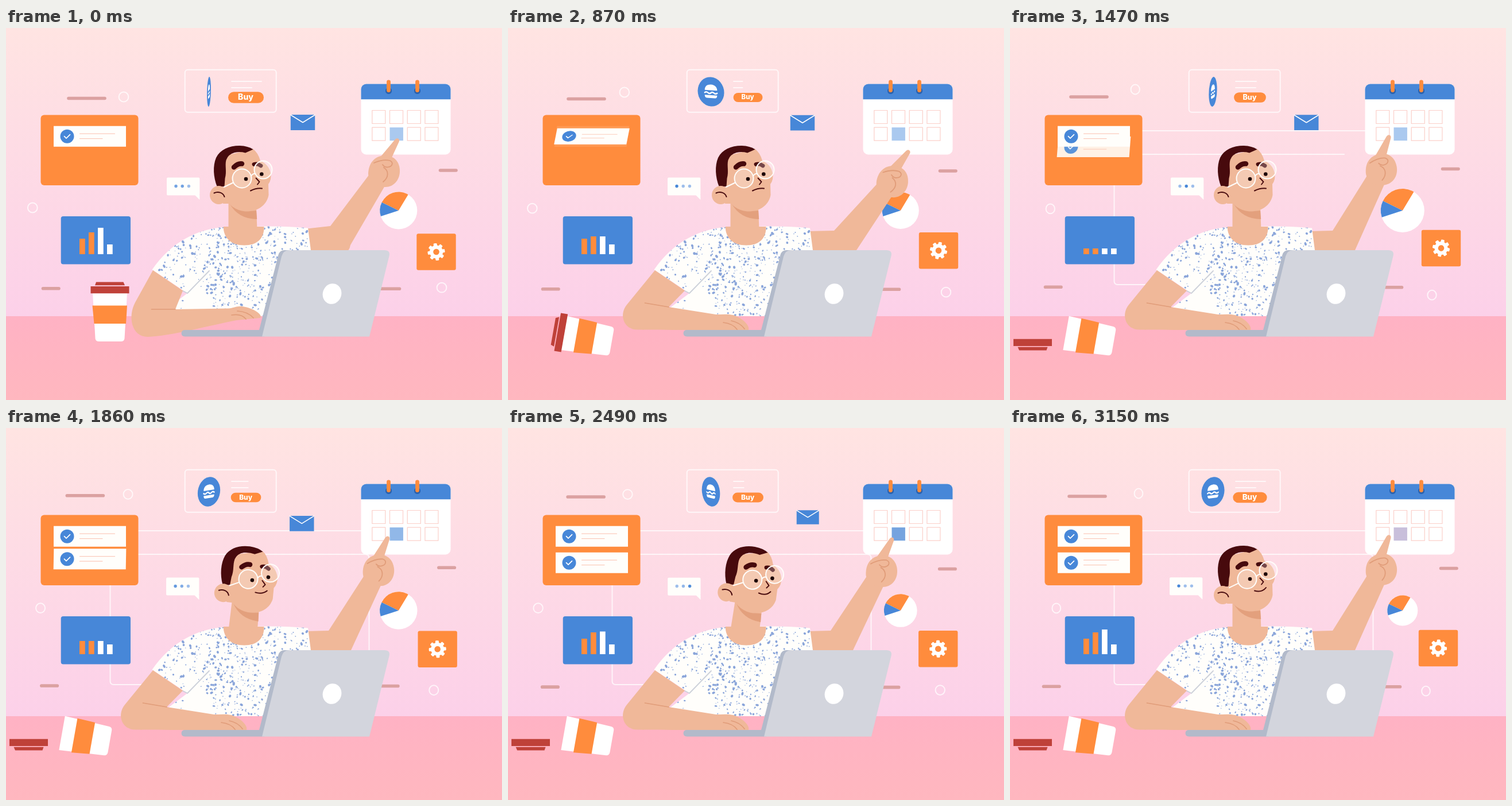
An HTML page with a canvas that plays this animation: 864x648 px, repeating every 3180 ms.

```html
<!DOCTYPE html>
<html lang="en">
<head>
<meta charset="utf-8">
<title>Planning at the desk</title>
<style>
html, body { margin: 0; width: 100%; height: 100%; overflow: hidden; background: #ffe4e2; }
canvas { display: block; width: 864px; height: 648px; }
</style>
</head>
<body>
<canvas id="stage" width="864" height="648"></canvas>
<script>
const ctx = document.getElementById('stage').getContext('2d');
const LOOP = 3180, STEP = 30;
const KEYS = [0, 480, 870, 1470, 2220, 2730, 3150];
const ORANGE = '#ff8c3d', BLUE = '#4787d8', SKIN = '#f0b899', CREASE = '#e09c79',
      HAIR = '#470a0d', GLASS = 'rgba(255,255,255,.74)', PAPER = '#fffefb', RED = '#bf4139';

// ---- timing ----
const clamp = u => Math.max(0, Math.min(1, u));
const smooth = u => u * u * (3 - 2 * u);
const linear = u => u;
const span = (t, a, b) => clamp((t - a) / (b - a));
const lerp = (a, b, u) => a + (b - a) * u;

function segment(t, times) {
  let i = 0;
  while (i < times.length - 2 && t >= times[i + 1]) i++;
  return [i, span(t, times[i], times[i + 1])];
}
function tween(t, vals, ease = smooth, times = KEYS) {
  const [i, u] = segment(t, times);
  return lerp(vals[i], vals[i + 1], ease(u));
}
// Hermite curve through unevenly spaced keys
function drift(t, vals, times = KEYS) {
  const [i, u] = segment(t, times), h = times[i + 1] - times[i];
  const slope = k => {
    const a = Math.max(0, k - 1), b = Math.min(vals.length - 1, k + 1);
    return (vals[b] - vals[a]) / (times[b] - times[a]);
  };
  const u2 = u * u, u3 = u2 * u;
  return vals[i] * (2 * u3 - 3 * u2 + 1) + vals[i + 1] * (3 * u2 - 2 * u3) +
    h * (slope(i) * (u3 - 2 * u2 + u) + slope(i + 1) * (u3 - u2));
}
// Blend two path strings with the same layout
function morph(a, b, u) {
  const nums = b.match(/-?[\d.]+/g);
  let i = 0;
  return a.replace(/-?[\d.]+/g, n => lerp(+n, +nums[i++], u).toFixed(2));
}

// ---- drawing helpers ----
function fill(path, color) { ctx.fillStyle = color; ctx.fill(new Path2D(path)); }
function line(path, color, width) {
  ctx.strokeStyle = color;
  ctx.lineWidth = width;
  ctx.stroke(new Path2D(path));
}
function box(x, y, w, h, color, r = 0) {
  ctx.fillStyle = color;
  ctx.beginPath();
  ctx.roundRect(x, y, w, h, r);
  ctx.fill();
}
function oval(x, y, rx, ry, color, stroke, tilt = 0) {
  ctx.beginPath();
  ctx.ellipse(x, y, rx, ry, tilt, 0, 7);
  if (color) { ctx.fillStyle = color; ctx.fill(); }
  if (stroke) { ctx.strokeStyle = stroke; ctx.lineWidth = 2; ctx.stroke(); }
}
function group(draw) { ctx.save(); draw(); ctx.restore(); }
function spin(deg) { ctx.rotate(deg * Math.PI / 180); }

// ---- speckles on the shirt ----
let seed = 71;
const rnd = () => (seed = (seed * 16807) % 2147483647) / 2147483647;
const specks = [];
for (let i = 0; i < 1050; i++) {
  const x = 258 + rnd() * 270, y = 346 + rnd() * 156, r = .6 + 1.6 * rnd() ** 2.5;
  const plain = y > 425 && x > 310 && x < 325 + (y - 425) * .5;
  const sparse = rnd() < Math.abs(x - 390) / 260;
  if (!plain && !sparse) specks.push([x, y, r, r * (.8 + rnd() * .8), rnd() * 3]);
}

// ---- scenery ----
function backdrop() {
  let g = ctx.createLinearGradient(0, 0, 0, 510);
  g.addColorStop(0, '#ffe4e2');
  g.addColorStop(1, '#fcd0e9');
  ctx.fillStyle = g;
  ctx.fillRect(0, 0, 864, 502);
  g = ctx.createLinearGradient(0, 502, 0, 648);
  g.addColorStop(0, '#ffb2c4');
  g.addColorStop(1, '#ffb7bf');
  ctx.fillStyle = g;
  ctx.fillRect(0, 502, 864, 146);
}

function connectors(t) {
  const trace = (path, begin) => {
    const reach = (t - begin) * .84;
    if (reach <= 0) return;
    ctx.setLineDash([reach, 2000]);
    line(path, GLASS, 2);
  };
  group(() => {
    trace('M230 179H619', 1000);
    trace('M230 220H626Q632.500 220 632.500 227V390', 1050);
    trace('M181.500 274V441Q181.500 447 188 447H250', 1050);
  });
}

function floaters(t) {
  const dx = drift(t, [0, 2, -4, -3, -3, -6.5, -6]);
  const dy = drift(t, [0, .5, 1, -2.5, -5.5, 0, -3.5]);
  group(() => {
    ctx.translate(dx, dy);
    line('M109 122.500H172M756.500 248H784M64.500 453.700H92M640 454.200H685.500', '#dba1a1', 5.6);
  });
  const d = drift(t, [0, 2.5, -4, 24, 2.5, 14.5, 34.5]);
  const e = drift(t, [0, 5, 8, 13, -2, 11, 6]);
  const rx = 8.4 - Math.abs(d) * .03;
  oval(205 + d * .55, 120 - e, rx, 8.4, null, GLASS);
  oval(46.3 + d, 313 + e * .15, rx, 8.4, null, GLASS);
  oval(759 - d, 452.200 + e, rx, 8.4, null, GLASS);
}

function row(y, scale, skew, alpha) {
  group(() => {
    ctx.globalAlpha = alpha;
    ctx.transform(1, 0, skew, scale, 146, y);
    box(-63, -18, 126, 36, PAPER);
    oval(-39.5, 0, 12, 12, BLUE);
    line('M-44.500 0L-41 3.500L-34.500 -3', '#fff', 1.7);
    line('M-17.500 -4.500H43.500M-17.500 4H22', '#fbcbbd', 1.2);
  });
}
function taskCard(t) {
  box(60.5, 151.5, 170, 122.5, ORANGE, 6);
  if (t > 780) {
    const out = smooth(span(t, 960, 2140));
    row(188.7 + 46 * out, 1, -.13 * (1 - out), span(t, 780, 1560));
  }
  const s = tween(t, [1, .5, .78, 1], smooth, [0, 480, 870, 1200]);
  row(188.7, s, -.25 * Math.sqrt(Math.max(0, 1 - s * s)), 1);
}

function chartCard(t) {
  box(95.7, 328, 121.300, 83.500, BLUE, 4);
  const cap = tween(t, [46, 46, 31, 10, 35, 42, 31, 43], linear,
    [0, 480, 870, 1470, 2220, 2420, 2730, 3150]);
  [27, 38, 46, 17].forEach((h, i) => {
    const v = Math.min(h, cap);
    box(128 + i * 16, 394 - v, 9.700, v, i < 2 ? ORANGE : '#fff');
  });
}

function shopCard(t) {
  ctx.beginPath();
  ctx.roundRect(311.700, 72.800, 159, 74, 5);
  ctx.strokeStyle = GLASS;
  ctx.lineWidth = 2;
  ctx.stroke();
  group(() => {
    const a = drift(t, [-82, -8, 20, 107, 180, 276, 325]) * Math.PI / 180;
    ctx.transform(Math.cos(a), .2 * Math.sin(a), 0, 1, 353.500, 111);
    oval(0, 0, 24.500, 25.500, BLUE);
    fill('M-11.500 -2.500C-11.500 -9 -7 -12.500 0 -12.500S11.500 -9 11.500 -2.500Z', '#fff');
    line('M-11.500 2Q-8.500 -.5 -5.500 2T0 2T5.500 2T11.500 2', '#fff', 2.4);
    fill('M-11.500 6H11.500Q11.500 11 7.500 11H-7.500Q-11.500 11 -11.500 6Z', '#fff');
  });
  const len = tween(t, [52, 52, 15.500, 36, 22, 14, 52]);
  line(`M393 93h${Math.min(52, len)}M393 104h${Math.min(35, len)}`, GLASS, 2);
  group(() => {
    const s = drift(t, [1, .935, .82, .9, .81, .935, .955]);
    ctx.translate(418, 121);
    ctx.scale(s, s);
    box(-31, -9.800, 62, 19.600, ORANGE, 9.800);
    ctx.fillStyle = '#fff';
    ctx.font = '800 14px Inter, "Open Sans", sans-serif';
    ctx.textAlign = 'center';
    ctx.fillText('Buy', -.5, 4.200);
  });
}

function bubble(t) {
  group(() => {
    ctx.translate(drift(t, [0, -2.5, -2, 0, -2, -1.5, -2]), drift(t, [0, -.5, 0, 0, 0, 0, -.4]));
    box(280, 260.600, 57.300, 31, PAPER, 2);
    fill('M329 291H337.300V299.200Z', PAPER);
    const phase = tween(t, [-1.83, -.83, 0, 1.33, 2.83, 4.33, 5], linear);
    for (let i = 0; i < 3; i++) {
      const gap = ((phase - i / 3) % 1 + 1) % 1;
      const lit = Math.max(0, 1 - 3 * Math.min(gap, 1 - gap));
      const c = [lerp(158, 71, lit), lerp(190, 135, lit), lerp(235, 216, lit)];
      oval(296 + i * 11.200, 275.500, 2.700, 2.700, `rgb(${c})`);
    }
  });
}

function calendar(t) {
  box(618.500, 97.500, 156, 123, '#fff', 9);
  box(618.500, 97.500, 156, 26.800, BLUE, [9, 9, 0, 0]);
  for (const x of [666.500, 716.500]) {
    oval(x, 109.500, 5.600, 5.600, '#2b62ae');
    box(x - 3.400, 90.500, 6.800, 21.500, ORANGE, 3.4);
  }
  const c = [
    [170, 170, 170, 170, 122, 112, 200],
    [201, 201, 201, 201, 168, 159, 191],
    [239, 239, 239, 239, 226, 220, 219]
  ].map(v => tween(t, v));
  ctx.strokeStyle = '#fbcfc9';
  ctx.lineWidth = 1.2;
  for (let i = 0; i < 8; i++) {
    const x = 637.800 + i % 4 * 30.700, y = i < 4 ? 143.500 : 173.200;
    if (i === 5) box(x, y, 23.400, 23, `rgb(${c})`);
    else ctx.strokeRect(x, y, 23, 23);
  }
}

function envelope(t) {
  const times = [0, 480, 870, 1470, 2220, 2420, 2730, 2880, 3030];
  const s = tween(t, [1, 1, 1, 1, 1, 1, .64, .4, 0], linear, times);
  if (s <= 0) return;
  group(() => {
    ctx.translate(drift(t, [517, 515.5, 513, 516.3, 514, 515, 559.5, 602, 655], times),
      drift(t, [164.5, 166.5, 165.2, 164.7, 167.5, 164, 112, 56, 95], times));
    ctx.scale(s, s);
    box(-21.200, -13.400, 42.400, 26.800, BLUE);
    line('M-21 -13L0 0L21 -13', '#fff', 1.6);
  });
}

function pie(t) {
  const r = drift(t, [32.5, 31.2, 32, 38, 27.5, 30.5, 26.5]);
  const slice = (a, b, color) => {
    ctx.beginPath();
    ctx.moveTo(683.800, 318);
    ctx.arc(683.800, 318, r, a * Math.PI / 180, b * Math.PI / 180);
    ctx.fillStyle = color;
    ctx.fill();
  };
  slice(0, 360, '#fff');
  slice(206, 301, ORANGE);
  slice(162, 206, BLUE);
}

function gearCard(t) {
  group(() => {
    ctx.translate(749.500 + drift(t, [0, 0, .5, 1.5, 2, -2.5, -3.5]),
      390 + drift(t, [0, -4, -2.3, -6.5, -3.2, -7.3, -6.5]));
    box(-34.200, -31.700, 68.400, 63.400, ORANGE, 3);
    spin(t * .075 - 8);
    oval(0, 0, 11.500, 11.500, '#fff');
    for (let i = 0; i < 8; i++) {
      box(-3, -15, 6, 8, '#fff', 1.500);
      spin(45);
    }
    oval(0, 0, 5.300, 5.300, ORANGE);
  });
}

// ---- cup ----
function cup(t) {
  const fall = span(t, 450, 810), tip = fall * fall;
  group(() => {
    ctx.translate(lerp(181, 135, tip), lerp(499.5, 538, tip));
    spin(-80 * tip);
    fill('M-30 -38H30L25.500 41Q25 46.500 19 46.500H-19Q-25 46.500 -25.500 41Z', '#fff');
    fill('M-30.500 -16H30L28 15.500H-27.500Z', ORANGE);
  });
  const pop = smooth(span(t, 890, 1290));
  const a = -80 * tip, rad = a * Math.PI / 180;
  const x = lerp(181, 135, tip) + 43.5 * Math.sin(rad);
  const y = lerp(499.5, 538, tip) - 43.5 * Math.cos(rad);
  group(() => {
    ctx.translate(lerp(x, 39.5, pop), lerp(y, 548, pop) - 10 * Math.sin(Math.PI * pop));
    spin(lerp(a, -180, pop));
    box(-33.500, -6, 67, 12.300, RED);
    fill('M-24 -13.500H23.500L26 -7.700H-26Z', RED);
  });
}

// ---- person ----
function pointingArm(t) {
  const hx = tween(t, [659, 659, 670, 647, 651, 651, 647]);
  const hy = tween(t, [249, 249, 267, 246, 249, 249, 246]);
  const turn = tween(t, [0, 0, 5, -10, -5, -5, -10]);
  const ex = tween(t, [565, 565, 568, 562, 562, 562, 562]);
  const ey = tween(t, [345, 345, 353, 353, 353, 353, 353]);
  const c = Math.cos(turn * Math.PI / 180), s = Math.sin(turn * Math.PI / 180);
  const at = (x, y) => `${hx + x * c - y * s} ${hy + x * s + y * c}`;
  const low = (ey - 345) / 8;
  fill(`M520 ${350 + low * 4}L${ex} ${ey}L${at(-26, 6)}L${at(0, 0)}L${at(1, 26)}` +
    `L${ex + lerp(35, 39, low)} ${lerp(378, 387, low)}Q${ex + 33} 390 ${ex + 25} 390H520Z`, SKIN);
  group(() => {
    ctx.translate(hx, hy);
    spin(turn);
    fill('M-8 -23L18.500 -54.500Q22 -58.500 25.200 -55.500Q27 -53 25 -49.500L11 -19L0 0Z', SKIN);
    fill('M-28 4C-27 -14 -17 -26 0 -27C19 -27 27 -14 27 0C27 16 16 28 2 28C-16 28 -28 19 -28 4Z', SKIN);
    line('M-18 -14Q-2 -21 10 -18C17 -14 13 -8 8 -7Q1 -5 -3 -11', CREASE, 1.8);
    line('M-1 -6C8 0 8 11 -2 19', CREASE, 1.8);
  });
}

function shirt() {
  const shape = new Path2D('M379 347C335 350 288 372 254.500 421L316 462L276 492L364 502H460L531 470V387L526 348.500Q490 345 449 345.500Z');
  group(() => {
    ctx.clip(shape);
    box(250, 340, 290, 162, PAPER);
    for (const [x, y, rx, ry, a] of specks) oval(x, y, rx, ry, '#8aa5da', null, a);
  });
  line('M308 458L316 462L354 423', '#cdd1da', 1.8);
}

function head(t) {
  const tilt = tween(t, [0, 0, 13, 13, 0, 0], smooth, [0, 1600, 2100, 2280, 2850, 3180]);
  const smile = smooth(span(t, 1560, 1950));
  group(() => {
    ctx.translate(406, 354);
    spin(tilt);
    ctx.translate(-406, -354);
    fill('M387.500 290V352H437.500L435.500 300Z', SKIN);
    fill('M389.500 306Q405 321 436 318L437.200 333Q405 333 389.500 306Z', '#e3a07d');
    fill('M376 240L384 222L430 210.500Q439 217 443 231Q458 238 461 253Q463 264 457 272L457.500 291C454 310 437 320 417 319.500C399 318 387 308 380 292Z', SKIN);
    fill('M368 277C361 260 360 240 366 226C373 212 388 205 407 205Q422 205.500 430.500 211.500L417 217.500Q408 215 398 217Q387 220 383.500 230C381 240 385 250 381.500 262L380.500 276Z', HAIR);
    oval(370.500, 291, 15.500, 16, SKIN);
    fill('M380 275H392V306H378Z', SKIN);
    line('M362.500 287.500C369 284.500 378 286 380.500 294', HAIR, 2);
    line('M397 242.500Q404 235.500 411 236.500', HAIR, 8.500);
    line('M432 237.500Q438 235.500 444 240', HAIR, 6.800);
    line('M435.500 261.500L441.500 268L438 272.500', HAIR, 1.9);
    line(morph('M426 283.500Q436 278.500 446 279.500', 'M426 283.500Q439 287 446 278', smile), HAIR, 2);
    const slip = span(t, 2400, 2800), lens = 'rgba(255,255,255,.25)';
    group(() => {
      ctx.translate(2 * slip, 1.2 * slip);
      oval(411, 262, 16.500, 16.500, lens, '#fffdfa');
      oval(448, 247, 15.500, 15.500, lens, '#fffdfa');
      line('M380 277L395.500 269.500M427 258Q430 253 434.500 254', '#fffdfa', 2);
    });
    oval(418, 263, 3.300, 3.300, '#1c0506');
    oval(445.300, 254.500, 3.300, 3.300, '#1c0506');
  });
}

function collar() {
  fill('M378.700 346H449.500C450 367 437 378.500 415 378.500C392 378.500 379 366 378.700 346Z', SKIN);
}

function restingArm(t) {
  const p = tween(t, [0, .67, 1, 1, 1, 1, 1], linear);
  const shape = morph(
    'M256 422L225 478C212 502 218 538 247 538C285 537 355 518 402 509L443 505C448 500 432 488 412 485C402 484 396 488 388 488.500L295 490L308 457.500Z',
    'M256 422L207 482C192 501 203 525.500 225 525.500C270 526 350 526 392 526L419 526C422 518 407 504 392 500C384 498 372 499 362 499L280 486L308 457.500Z', p);
  fill(shape, SKIN);
  line(morph('M253.500 490L295 490', 'M238.500 479L280 486', p), CREASE, 1.7);
  line(morph('M393 500Q410 497 418 507M403 493Q421 494 431 505',
    'M375 513Q392 515 399 525M389 510Q404 513 412 524', p), CREASE, 1.7);
}

function laptop() {
  fill('M496 387H485Q477 387 474.500 395L441 526H312Q305.500 526 305.500 531.800T312 537.500H450Z', '#b2baca');
  fill('M446 537.500L480 398Q483 387 493 387H659Q670 387 667.500 397L633 537.500Z', '#d3d5dd');
  oval(568, 463, 16.200, 18, '#fff', null, .35);
}

function frame(t) {
  ctx.lineJoin = 'round';
  ctx.lineCap = 'butt';
  backdrop();
  connectors(t);
  ctx.lineCap = 'round';
  floaters(t);
  taskCard(t);
  chartCard(t);
  shopCard(t);
  bubble(t);
  calendar(t);
  envelope(t);
  pie(t);
  gearCard(t);
  cup(t);
  pointingArm(t);
  shirt();
  collar();
  head(t);
  restingArm(t);
  laptop();
}

const start = performance.now();
function tick() {
  const t = (performance.now() - start) % LOOP;
  frame(Math.floor(t / STEP) * STEP);
  requestAnimationFrame(tick);
}
tick();
</script>
</body>
</html>
```
